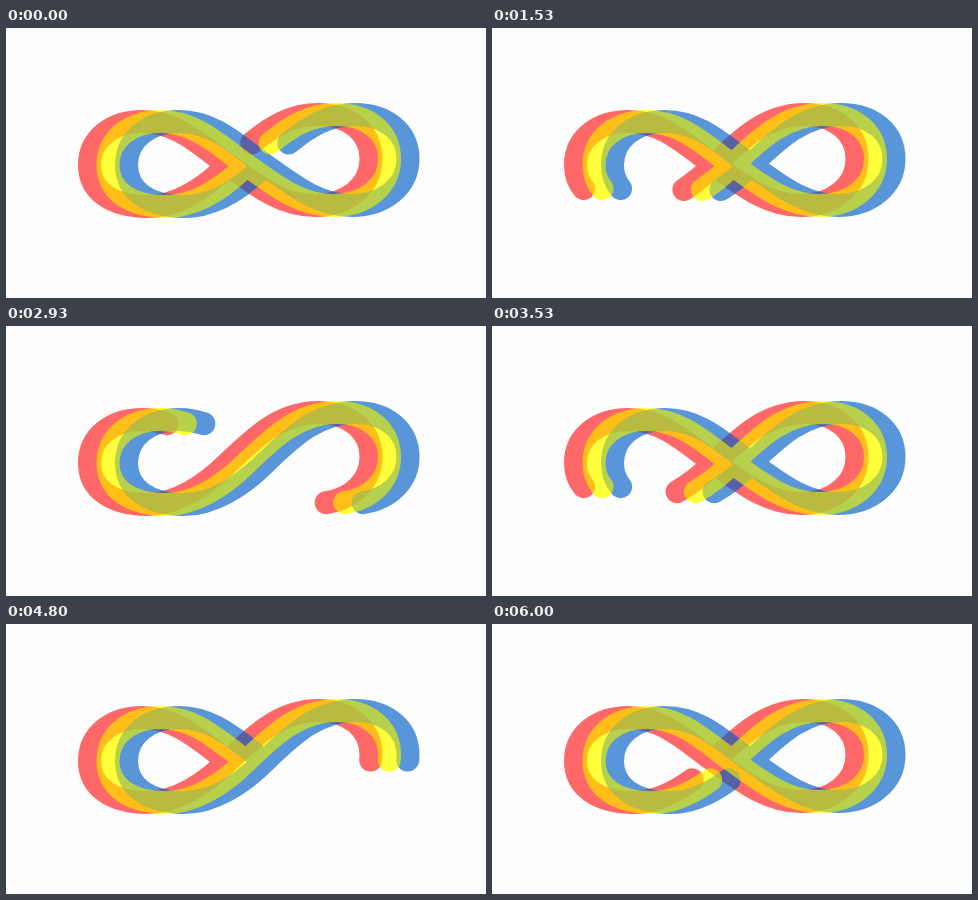
An HTML page for the animation above (6070 ms loop, 480 px wide and 270 px high).

```html
<!DOCTYPE html>
<html lang="en">
<head>
<meta charset="utf-8">
<title>Infinity loop</title>
<style>
  html, body { margin: 0; width: 100%; height: 100%; overflow: hidden; background: #fdfdfd; }
  svg { display: block; width: 480px; height: 270px; }
  #loop { fill: none; stroke-width: 23; stroke-linecap: round; stroke-linejoin: round; }
</style>
</head>
<body>
<svg viewBox="0 0 480 270">
  <defs>
    <path id="loop" pathLength="709" d="M222 137
      C250 110 275 86.5 312 86.5 C343 86.5 365 104 365 131
      C365 158 341 177.5 309 177.5 C275 177.5 250 157 222 137
      C194 117 171 93.5 136 93.5 C107 93.5 83.5 110 83.5 137
      C83.5 163 106 178.5 141 178.5 C170 178.5 199 160 222 137Z"/>
  </defs>
  <use href="#loop" x="18.5" stroke="#ffff8c"/>
  <use href="#loop" stroke="#f00" opacity=".59"/>
  <use href="#loop" x="37" stroke="#025fc6" opacity=".65"/>
  <use href="#loop" x="18.5" stroke="#ff0" opacity=".57"/>
</svg>
<script>
  const LENGTH = 709, LAP = 2000, DURATION = 6070;
  const loop = document.getElementById('loop');

  // [phase of lap, distance along the path, slip per lap]
  const gapFront = [[0, 32, 8], [.2, 168, 0], [.6, 557, 0], [.767, 677, 8]];
  const gapBack = [[0, -5, 8], [.2, 58, 8], [.6, 387, 0], [.767, 563, 0]];

  // Smooth periodic curve through the keys, advancing one path length per lap
  function position(keys, laps) {
    const phase = laps % 1, n = keys.length;
    const key = i => {
      const turn = Math.floor(i / n), [p, distance, slip] = keys[i - turn * n];
      return [p + turn, distance + turn * LENGTH - slip * laps];
    };
    const slope = i => {
      const [a, b, c] = [key(i - 1), key(i), key(i + 1)];
      const before = (b[1] - a[1]) / (b[0] - a[0]), after = (c[1] - b[1]) / (c[0] - b[0]);
      return (before * (c[0] - b[0]) + after * (b[0] - a[0])) / (c[0] - a[0]);
    };
    let i = 0;
    while (key(i + 1)[0] <= phase) i++;
    const [p0, y0] = key(i), [p1, y1] = key(i + 1);
    const h = p1 - p0, s = (phase - p0) / h, r = 1 - s;
    return r * r * ((1 + 2 * s) * y0 + s * h * slope(i)) +
           s * s * ((1 + 2 * r) * y1 - r * h * slope(i + 1));
  }

  function draw(now) {
    const laps = (now % DURATION) / LAP;
    const front = position(gapFront, laps);
    const gap = front - position(gapBack, laps);
    loop.setAttribute('stroke-dasharray', `${LENGTH - gap} ${gap}`);
    loop.setAttribute('stroke-dashoffset', -front);
  }

  const start = performance.now();
  function tick() {
    draw(performance.now() - start);
    requestAnimationFrame(tick);
  }
  tick();
</script>
</body>
</html>
```
